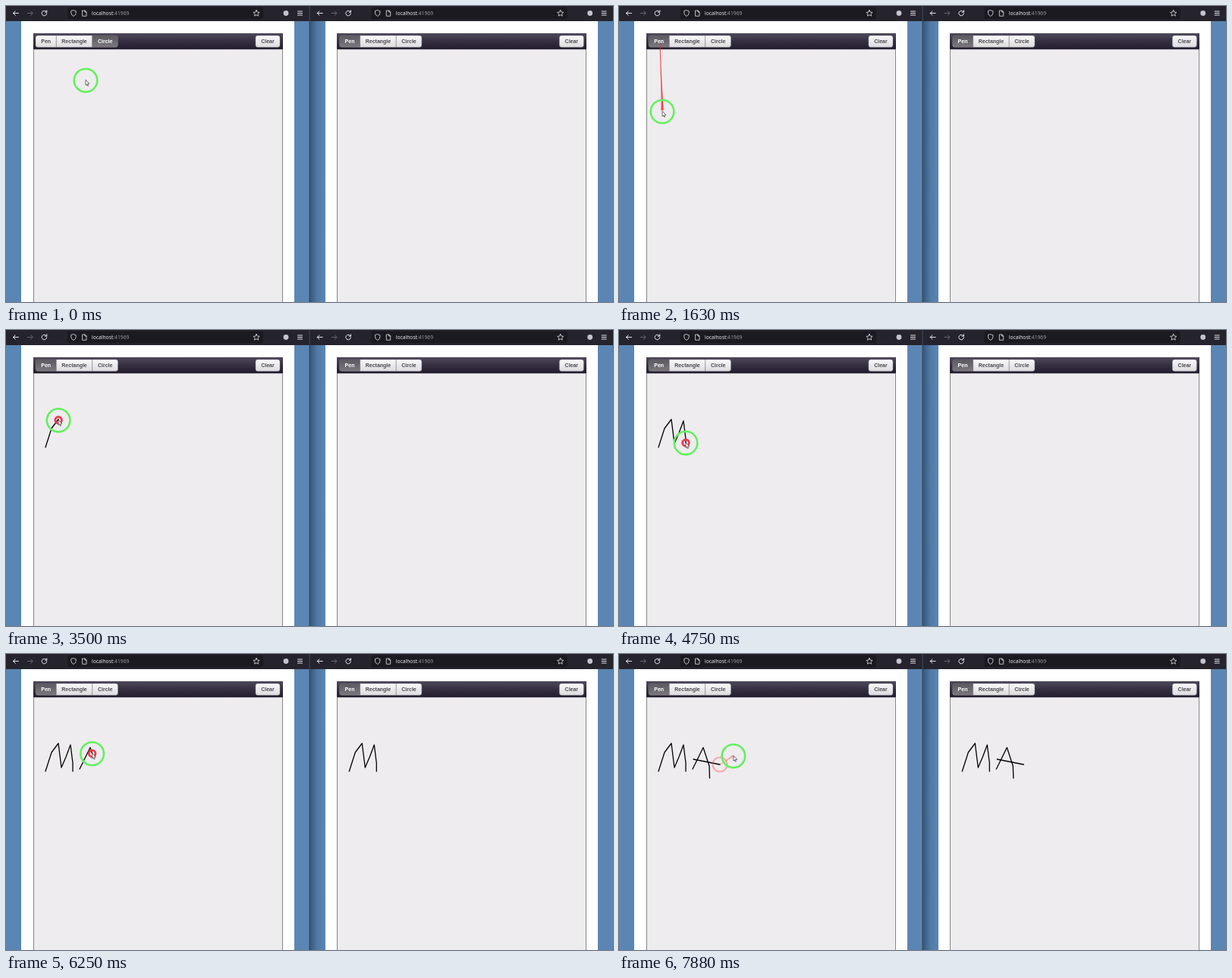
An HTML page with a canvas for the animation above (8 s loop, 800 by 391 pixels).

```html
<!DOCTYPE html>
<html lang="en">
<head>
<meta charset="utf-8">
<title>Shared drawing board</title>
<style>
  html, body { margin: 0; width: 100%; height: 100%; overflow: hidden; background: #5b86b4; }
  svg, canvas { position: absolute; left: 0; top: 0; width: 800px; height: 391px; }
  .url { font: 6.75px "Open Sans", "Noto Sans", sans-serif; fill: #f4f4f6; }
  .url .port { fill: #a2a1a9; }
  .label { font: bold 7px "Liberation Sans", Arial, sans-serif; fill: #4b4950; text-anchor: middle; }
  .icon { fill: none; stroke: #e6e6ea; stroke-linecap: round; stroke-linejoin: round; }
  .fine { stroke-width: .8; }
  .tool .face { fill: url(#light); }
  .tool.on .face { fill: url(#dark); }
  .tool.on .label { fill: #fff; }
</style>
</head>
<body>
<svg id="scene" viewBox="0 0 800 391"></svg>
<canvas id="ink" width="800" height="391"></canvas>
<script>
const LOOP = 8000, STEP = 125;

// What the pointer does; it glides freely from one gesture to the next
const gestures = [
  { down: 0, up: 0, points: [[105, 98]] },
  { down: 1125, up: 1250, points: [[54, 49]] },
  { down: 2930, up: 4830, points: [[52, 155], [60, 130], [69, 118], [73, 150], [79, 136], [85, 120], [88, 144], [88, 155]] },
  { down: 5800, up: 6625, points: [[97, 152], [111, 123.5], [119, 148], [119.5, 164]] },
  { down: 7125, up: 7625, points: [[98, 139], [133, 146]] },
  { down: 8125, up: 8125, points: [[154, 134]] }
];
const strokes = gestures.filter(g => g.points.length > 1);
const picking = gestures[1];

const gradient = (id, end, ...colors) => `<linearGradient id="${id}" x2="0" ${end}>` +
  colors.map((c, i) => `<stop offset="${i / (colors.length - 1)}" stop-color="${c}"/>`).join("") +
  `</linearGradient>`;
const rect = (x, y, w, h, fill, more = "") =>
  `<rect x="${x}" y="${y}" width="${w}" height="${h}" fill="${fill}" ${more}/>`;

// A button whose left and right corners can be rounded separately
function button(id, x0, x1, label, left, right) {
  const l = left ? 3 : 0, r = right ? 3 : 0;
  const d = `M${x0 + l} 39H${x1 - r}q${r} 0 ${r} ${r}V${54.5 - r}q0 ${r} ${-r} ${r}` +
    `H${x0 + l}q${-l} 0 ${-l} ${-l}V${39 + l}q0 ${-l} ${l} ${-l}z`;
  return `<g class="tool" id="${id}"><path class="face" d="${d}" stroke="#77737c" stroke-width=".4"/>` +
    `<text class="label" x="${(x0 + x1) / 2}" y="49.4">${label}</text></g>`;
}

function star(cx, cy, r) {
  const pts = Array.from({ length: 10 }, (_, i) => {
    const a = i * Math.PI / 5 - Math.PI / 2, q = i % 2 ? r * .48 : r;
    return (cx + q * Math.cos(a)).toFixed(2) + "," + (cy + q * Math.sin(a)).toFixed(2);
  });
  return `<polygon class="fine" points="${pts.join(" ")}"/>`;
}

function chrome(x) {
  return rect(x ? 400 : 0, 0, 400, 20, "#25242c") + `<g transform="translate(${x})">` +
    rect(81, 1.5, 258, 16, "#1b1a21", 'rx="2"') +
    `<g class="icon">
      <path d="M16.5 9.5H9.5M12.3 6.7L9.5 9.5l2.8 2.8"/>
      <path stroke="#66656e" d="M28.5 9.5H35M32.5 6.7L35.3 9.5l-2.8 2.8"/>
      <path d="M53 7.4A3.3 3.3 0 1 0 53.8 9.8M53.8 5.8V8.2H51.4"/>
      <path class="fine" d="M89 5.7l3.2 1.1v2.3q0 3-3.2 4.4q-3.2-1.4-3.2-4.4V6.8z"/>
      <path class="fine" d="M101 6h3l2 2v5.3h-5zM104 6v2h2"/>
      ${star(330, 9.7, 4.3)}
      <path d="M384.5 7h6M384.5 9.5h6M384.5 12h6"/>
    </g>
    <circle cx="369" cy="9.5" r="3.4" fill="#c4c4ca"/>
    <text class="url" x="113" y="12.2">localhost<tspan class="port">:41969</tspan></text></g>`;
}

function page(x, side) {
  return `<g transform="translate(${x})">` +
    rect(0, 20, 400, 371, "#5b86b4") +
    (side ? rect(0, 20, 21, 371, "url(#shade)") : "") +
    rect(20 + side, 20, 360 - side, 371, "#fff") +
    rect(36, 36, 329, 360, "#eeecef") +
    `<path d="M36.5 391V36.5H364.5V391" fill="none" stroke="#87858b"/>` +
    rect(36, 36, 329, 21, "url(#bar)") +
    rect(36, 57, 329, .6, "#8b8890") +
    `<g transform="translate(${side * .4})">` +
    button("pen" + side, 39, 66.3, "Pen", 1, 0) +
    button("box" + side, 66.3, 113.8, "Rectangle", 0, 0) +
    button("circle" + side, 113.8, 147.5, "Circle", 0, 1) +
    button("clear" + side, 328.9, 361, "Clear", 1, 1) + `</g></g>`;
}

const byId = id => document.getElementById(id);
const down = 'y2="1"';
byId("scene").innerHTML = `<defs>` +
  gradient("bar", down, "#50495c", "#362f42", "#231c2d") +
  gradient("light", down, "#f9f9fa", "#dcdbde") +
  gradient("dark", down, "#5b5960", "#7b797e") +
  gradient("shade", 'x1="1"', "#5b86b4", "#517aa5", "#355677") + `</defs>` +
  page(0, 0) + page(400, 1) + chrome(0) + chrome(400.7) +
  rect(399.5, 0, 1.2, 391, "#34475c");
byId("pen1").classList.add("on");

const ctx = byId("ink").getContext("2d");
ctx.lineCap = ctx.lineJoin = "round";

const mix = (a, b, k) => [a[0] + (b[0] - a[0]) * k, a[1] + (b[1] - a[1]) * k];
const dist = (a, b) => Math.hypot(b[0] - a[0], b[1] - a[1]);
const last = list => list[list.length - 1];

// The part of a gesture made by time t, at constant speed
function drawn({ down, up, points }, t) {
  const lengths = points.slice(1).map((p, i) => dist(points[i], p));
  let rest = lengths.reduce((a, b) => a + b, 0) * Math.min(1, (t - down) / (up - down || 1));
  const out = [points[0]];
  for (let i = 0; i < lengths.length && rest > 0; i++) {
    out.push(mix(points[i], points[i + 1], Math.min(1, rest / lengths[i])));
    rest -= lengths[i];
  }
  return out;
}

// Slowing, slightly bowed move between two gestures
function glide(from, to, t) {
  const a = last(from.points), b = to.points[0];
  const k = Math.min(1, (t - from.up) / Math.min(800, to.down - from.up));
  const [x, y] = mix(a, b, 1 - (1 - k) ** 3);
  const bow = .045 * Math.sin(Math.PI * k);
  return [x + (b[1] - a[1]) * bow, y - (b[0] - a[0]) * bow];
}

function at(t) {
  const i = gestures.findIndex(g => t <= g.up), g = gestures[i];
  return t >= g.down ? last(drawn(g, t)) : glide(gestures[i - 1], g, t);
}

function line(points, dx = 0) {
  ctx.beginPath();
  points.forEach(([x, y]) => ctx.lineTo(x + dx, y));
  ctx.strokeStyle = "#000";
  ctx.lineWidth = 1.3;
  ctx.stroke();
}

function ring([x, y], r, width, color) {
  ctx.beginPath();
  ctx.arc(x, y, r, 0, 2 * Math.PI);
  ctx.strokeStyle = color;
  ctx.lineWidth = width;
  ctx.stroke();
}

// Tapered red streak, widest at the pointer and stronger when it is fast
function streak(from, to) {
  const n = 16, left = [], right = [];
  const a = at(from), b = at(to), len = dist(a, b) || 1;
  for (let i = 0; i <= n; i++) {
    const [x, y] = at(from + (to - from) * i / n);
    const w = (.5 + 1.2 * (i / n) ** 2) / len;
    const nx = (a[1] - b[1]) * w, ny = (b[0] - a[0]) * w;
    left.push([x + nx, y + ny]);
    right.unshift([x - nx, y - ny]);
  }
  ctx.beginPath();
  [...left, ...right].forEach(p => ctx.lineTo(...p));
  ctx.fillStyle = `rgba(255,35,35,${Math.min(.85, len / 60)})`;
  ctx.fill();
}

function arrow(x, y) {
  ctx.save();
  ctx.translate(x, y);
  const shape = new Path2D("M0 0V6.6L1.5 5.3L2.5 7.6L3.5 7.2L2.5 4.9L4.5 4.8Z");
  ctx.fillStyle = "#fff";
  ctx.fill(shape);
  ctx.strokeStyle = "#333";
  ctx.lineWidth = .7;
  ctx.stroke(shape);
  ctx.restore();
}

function draw(t) {
  const picked = t >= picking.up;
  byId("pen0").classList.toggle("on", picked);
  byId("circle0").classList.toggle("on", !picked);

  ctx.clearRect(0, 0, 800, 391);
  const tip = at(t);
  for (const s of strokes.filter(s => t > s.down)) {
    const points = drawn(s, t);
    line(points);
    if (t >= s.up + STEP) line(points, 400.3);
  }
  for (const g of [picking, ...strokes]) {
    const age = t - g.up;
    if (t >= g.down && age < 0) ring(tip, 4.3, 2.8, "#f0384a");
    if (age > 0 && age < 500) streak(g.up, t - 12);
    if (g !== picking && age >= 0 && age < 450)
      ring(last(g.points), 4.5 + 5 * Math.min(1, age / 250), 2.2, `rgba(255,70,70,${.9 * (1 - age / 450)})`);
  }
  ring([tip[0], tip[1] + .3], 15.3, 2.6, "#62f25c");
  arrow(...tip);
}

const start = performance.now();
function tick() {
  const t = (performance.now() - start) % LOOP;
  draw(Math.floor(t / STEP) * STEP);
  requestAnimationFrame(tick);
}
tick();
</script>
</body>
</html>
```
